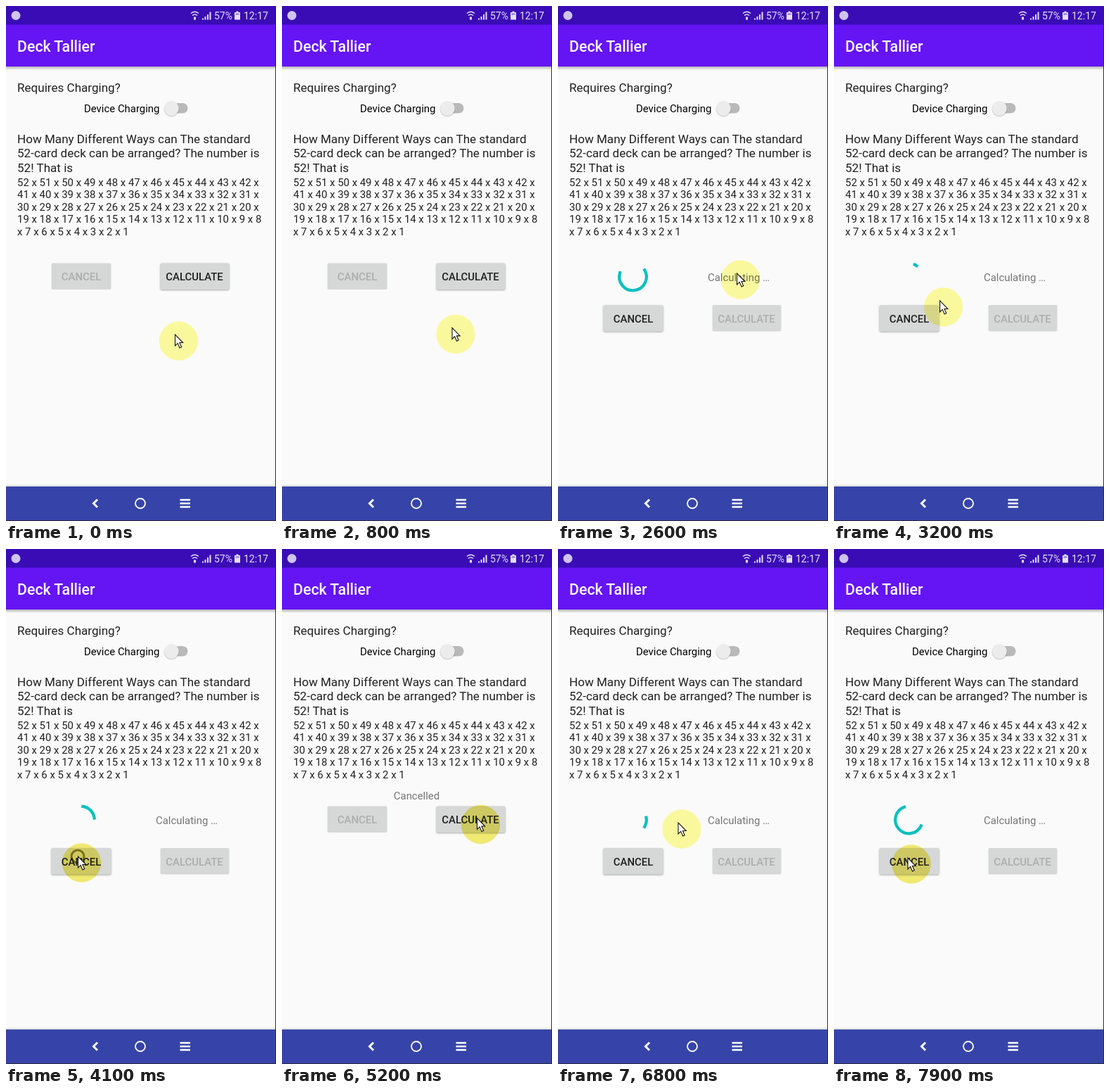
Recreate the animation shown at these times as an HTML page. Size 384 px wide and 732 px high, loop 8000 ms.

```html
<!DOCTYPE html>
<html lang="en">
<head>
<meta charset="utf-8">
<title>Deck Tallier</title>
<style>
  html, body { margin: 0; width: 100%; height: 100%; overflow: hidden; background: #fafafa; }
  svg { display: block; width: 384px; height: 732px; font-family: Roboto, Arial, sans-serif; }
  .bar { fill: #e6e0f8; font-size: 14px; }
  .title { fill: #fff; font-size: 21.33px; font-weight: 500; }
  .body { fill: #212121; font-size: 17.07px; }
  .small { fill: #212121; font-size: 14.93px; }
  .status { fill: #767676; font-size: 14.93px; }
  .button rect { fill: #d6d7d7; }
  .button text { fill: #adadad; font-size: 14.93px; font-weight: 500; text-anchor: middle; }
  .button.on rect { filter: drop-shadow(0 1.5px 1px rgba(0, 0, 0, .32)); }
  .button.on text { fill: #202020; }
  #halo, #ring { mix-blend-mode: multiply; }
</style>
</head>
<body>
<svg viewBox="0 0 384 732">
  <defs>
    <linearGradient id="shade" x2="0" y2="1">
      <stop stop-color="#000" stop-opacity=".28"/>
      <stop offset="1" stop-color="#000" stop-opacity="0"/>
    </linearGradient>
  </defs>
  <rect width="384" height="732" fill="#fafafa"/>

  <rect y="26" width="384" height="60" fill="#6514f4"/>
  <rect y="86" width="384" height="5" fill="url(#shade)"/>
  <rect width="384" height="26.5" fill="#3a0cb6"/>
  <circle cx="14" cy="13.5" r="6.5" fill="#cfc4f0"/>
  <g fill="none" stroke="#e6e0f8" stroke-width="1.5">
    <path d="M263 10.5q5.500-4.500 11 0M265 13.500q3.500-3 7 0"/>
    <path d="M268.500 15.500v4" stroke-width="3"/>
    <path d="M280 17.500v2M283.500 15v4.500M287 12v7.500M290.500 8.500v11" stroke-width="2"/>
  </g>
  <path d="M327.500 7.500h3V9h2.500v10.500h-8V9h2.500z" fill="#e6e0f8"/>
  <path d="M326.500 10.500h5v2h-5z" fill="#8a70d4"/>
  <g class="bar">
    <text x="296" y="19">57%</text>
    <text x="338" y="19">12:17</text>
  </g>
  <text class="title" x="16" y="64.500">Deck Tallier</text>

  <text class="body" x="16" y="121.500">Requires Charging?</text>
  <text class="small" x="111" y="151" style="fill:#000">Device Charging</text>
  <rect x="230" y="138" width="28.500" height="14.500" rx="7.250" fill="#b9b9b9"/>
  <circle cx="235.500" cy="146.500" r="11" fill="#000" opacity=".13"/>
  <circle cx="235.500" cy="145.500" r="10.300" fill="#ececec"/>
  <g class="body">
    <text x="16" y="195">How Many Different Ways can The standard</text>
    <text x="16" y="215">52-card deck can be arranged? The number is</text>
    <text x="16" y="235.500">52! That is</text>
  </g>
  <g class="small" id="factors"></g>

  <text class="status" id="cancelled" x="191.500" y="356" text-anchor="middle">Cancelled</text>
  <g id="working">
    <path id="arc" fill="none" stroke="#0cbfbf" stroke-width="4.300" stroke-linecap="square"/>
    <text class="status" x="213" y="390.500">Calculating …</text>
  </g>
  <g id="buttons">
    <g class="button" id="cancel">
      <rect x="64.500" y="365.500" width="85" height="37.500" rx="2"/>
      <text x="107" y="390">CANCEL</text>
    </g>
    <g class="button" id="calculate">
      <rect x="219.500" y="365.500" width="98" height="37.500" rx="2"/>
      <text x="268" y="390">CALCULATE</text>
    </g>
  </g>

  <rect y="-683" width="384" height="3" fill="url(#shade)" opacity=".6" transform="scale(1 -1)"/>
  <rect y="683" width="384" height="49" fill="#3644a9"/>
  <g fill="none" stroke="#fff" stroke-width="2.600">
    <path d="M130 701.500l-5.500 5.500 5.500 5.500" stroke-width="3"/>
    <circle cx="191" cy="707" r="7" stroke-width="1.800"/>
    <path d="M247.500 702h14.500M247.500 707h14.500M247.500 712h14.500"/>
  </g>
  <path d="M383.500 0V732M0 731.500H384" stroke="#2a2a3c" fill="none"/>

  <g id="pointer">
    <circle id="halo" r="27.700"/>
    <circle id="ring" cx="-5.500" cy="-9" fill="none" stroke="#9c9040" stroke-width="3"/>
    <path d="M-5-9v16l3.700-3.600 2.800 6.500 2.700-1.200-2.800-6.200H6.200z" fill="#fff" stroke="#111" stroke-width="1.100"/>
  </g>
</svg>
<script>
const LOOP = 8000, STEP = 100;
const $ = id => document.getElementById(id);

// Pointer stops: [ms, x, y]
const route = [
  [0, 245.5, 476], [900, 247, 466], [1500, 259.5, 389], [2700, 259.5, 389],
  [3500, 107.5, 446], [4500, 107.5, 446], [5200, 282.5, 391.5], [5500, 282.5, 391.5],
  [5700, 274, 390], [6300, 264, 390], [6800, 176, 398], [7200, 146.5, 412],
  [7600, 112, 447], [7900, 110, 448]
];
const clicks = [1600, 3900, 5600];
// Each run: visible span, spinner start, turn in degrees at start, degrees per second
const runs = [
  { from: 1800, to: 4200, start: 1791, turn: -115, rate: 96 },
  { from: 5800, to: LOOP, start: 5754, turn: -84, rate: 214 }
];

const rows = [[52, 42], [41, 31], [30, 20], [19, 8], [7, 1]];
$('factors').innerHTML = rows.map(([high, low], i) => {
  const numbers = Array.from({ length: high - low + 1 }, (_, k) => high - k).join(' x ');
  const text = i === 4 ? 'x ' + numbers : i === 3 ? numbers : numbers + ' x';
  return `<text x="16" y="${256 + i * 17.4}">${text}</text>`;
}).join('');

function pointerAt(t) {
  const i = route.findIndex(stop => stop[0] > t);
  if (i < 0) return route[route.length - 1].slice(1);
  const [t0, x0, y0] = route[i - 1], [t1, x1, y1] = route[i];
  const u = (t - t0) / (t1 - t0), e = u * u * (3 - 2 * u);
  return [x0 + (x1 - x0) * e, y0 + (y1 - y0) * e];
}

// Cubic easing from (0,0) to (1,1), solved by bisection
function bezier(x1, y1, x2, y2, x) {
  const curve = (a, b, s) => 3 * a * s * (1 - s) ** 2 + 3 * b * s * s * (1 - s) + s ** 3;
  let low = 0, high = 1;
  for (let i = 0; i < 24; i++) {
    const mid = (low + high) / 2;
    if (curve(x1, x2, mid) < x) low = mid; else high = mid;
  }
  return curve(y1, y2, low);
}

function arcPath(from, sweep) {
  const point = deg => {
    const a = deg * Math.PI / 180;
    return `${106.5 + 19.3 * Math.sin(a)} ${385 - 19.3 * Math.cos(a)}`;
  };
  return `M${point(from)}A19.3 19.3 0 ${sweep > 180 ? 1 : 0} 1 ${point(from + sweep)}`;
}

function spinner(run, t) {
  const age = t - run.start, phase = age / 1333 % 1;
  const head = phase < .5 ? bezier(.4, 0, .2, 1, phase * 2) : 1;
  const tail = phase > .5 ? bezier(.4, 0, .2, 1, phase * 2 - 1) : 0;
  const from = run.turn + run.rate * age / 1000 + 90 * phase + 270 * tail;
  return arcPath(from, Math.max(1, 270 * (head - tail)));
}

const show = (id, on) => $(id).setAttribute('visibility', on ? 'visible' : 'hidden');

function draw(t) {
  const run = runs.find(r => t >= r.from && t < r.to);
  const shift = run ? 59.5 : 0;
  show('working', run);
  show('cancelled', t >= runs[0].to && t < runs[1].from);
  if (run) $('arc').setAttribute('d', spinner(run, t));
  $('buttons').setAttribute('transform', `translate(0 ${shift})`);
  $('cancel').classList.toggle('on', !!run);
  $('calculate').classList.toggle('on', !run);

  const [x, y] = pointerAt(t);
  const overRow = y > 365 + shift && y < 404 + shift;
  const overButton = overRow && (x > 64 && x < 150 || x > 219 && x < 318);
  // Blending needs absolute positions rather than an isolated moving group
  for (const part of $('pointer').children) part.setAttribute('transform', `translate(${x} ${y})`);
  $('halo').setAttribute('fill', overButton ? '#f5ee74' : '#fffda0');

  const click = clicks.find(c => t >= c && t <= c + 200);
  show('ring', click !== undefined && !(run && t < run.from + 100));
  if (click !== undefined) $('ring').setAttribute('r', 5 + (t - click) * .02);
}

function tick(now) {
  draw(Math.floor(now % LOOP / STEP) * STEP);
  requestAnimationFrame(tick);
}
draw(0);
requestAnimationFrame(tick);
</script>
</body>
</html>
```
